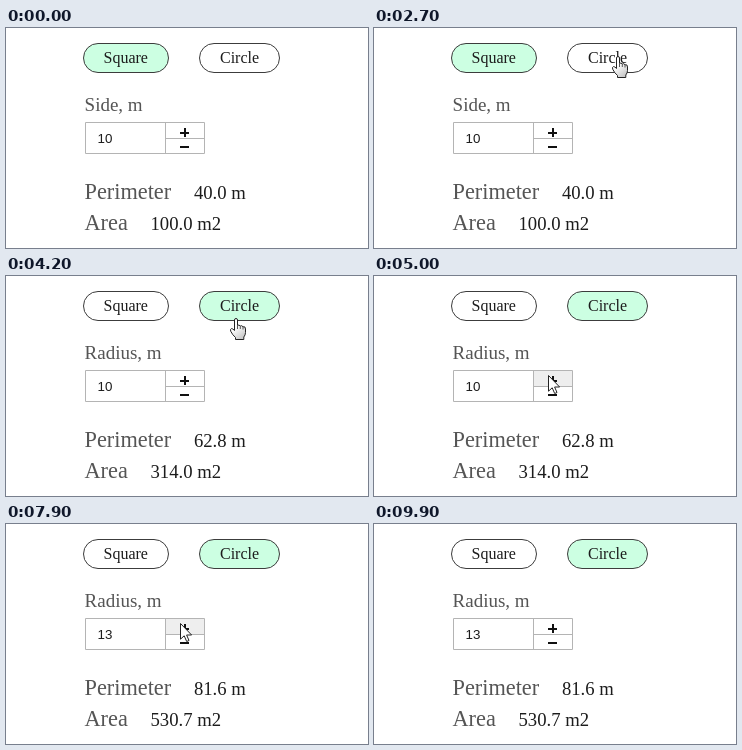
Write an HTML page that moves like this. It is 362 px wide and 220 px high and loops after 10 s.

```html
<!DOCTYPE html>
<html lang="en">
<head>
<meta charset="utf-8">
<title>Shape calculator</title>
<style>
  html, body { margin: 0; width: 100%; height: 100%; overflow: hidden; background: #fff; }
  svg { display: block; }
  text { font-family: "Liberation Serif", "Times New Roman", serif; fill: #1c1c1c; }
  .pill { fill: #fff; stroke: #3c3c3c; }
  .pill.on { fill: #ccffe2; }
  .tab { font-size: 16px; }
  .label { font-size: 19px; fill: #555; }
  .name { font-size: 22.3px; fill: #555; }
  .value { font-size: 18.7px; }
  .field { font: 13.33px "Liberation Sans", Arial, sans-serif; }
  .line { fill: none; stroke: #b4b4b4; }
  .cursor { fill: #fff; stroke: #222; stroke-linejoin: round; }
  .crease { fill: none; stroke: #555; }
</style>
</head>
<body>
<svg width="362" height="220" viewBox="0 0 362 220">
  <defs>
    <linearGradient id="skin" x1="0" y1="0" x2=".6" y2="1">
      <stop offset=".45" stop-color="#fff"/>
      <stop offset="1" stop-color="#ccc"/>
    </linearGradient>
  </defs>

  <rect id="squareTab" class="pill" x="77.5" y="15.5" width="85" height="29" rx="14.5"/>
  <text class="tab" x="97.5" y="35">Square</text>
  <rect id="circleTab" class="pill" x="193.5" y="15.5" width="80" height="29" rx="14.5"/>
  <text class="tab" x="214" y="35">Circle</text>

  <g id="form">
    <text id="label" class="label" x="78.6" y="83"></text>
    <rect id="plusBg" x="160" y="95" width="38" height="15" fill="#eee"/>
    <path class="line" d="M79.5 94.5H198.5V125.5H79.5ZM159.5 95V125M160 110.5H198"/>
    <text id="side" class="field" x="91.5" y="115"></text>
    <path d="M174 104h9v2h-9zM178 100h2v9h-2zM174 118h9v2h-9z" fill="#111"/>
  </g>
  <rect id="caret" x="106" y="103" width="1" height="15" fill="#000"/>

  <text class="name" x="78.5" y="171">Perimeter</text>
  <text id="perimeter" class="value" x="187.9" y="171"></text>
  <text class="name" x="78.5" y="202">Area</text>
  <text id="area" class="value" x="144.5" y="202"></text>

  <path id="arrow" class="cursor" d="M.5 .5V16.2L4.2 12.8 6.7 18.5 9 17.5 6.6 12H11.6Z"/>
  <g id="hand">
    <path class="cursor" style="fill: url(#skin)" d="M-1.5 12.5V2Q-1.5 .5 0 .5T1.5 2V7.5Q3 6.3 4.3 8 5.8 7 7 8.8 9.5 8 9.5 11V14.5Q9.5 17 7.8 19V21.5H-.5V19.5Q-3.5 17 -5.3 13.2 -6 11 -4.6 10.6 -3.2 10.5 -1.5 12.5Z"/>
    <path class="crease" d="M1.5 7.5V11M4.3 8V11M7 8.8V11.5"/>
  </g>
</svg>
<script>
const LOOP = 10000, STEP = 100, PI = 3.14;
const $ = id => document.getElementById(id);
const show = (id, on) => { $(id).style.display = on ? "" : "none"; };
const put = (id, text) => { if ($(id).textContent !== text) $(id).textContent = text; };

// Pointer key points: time, x, y
const path = [
  [1900, 351, 33], [2300, 296, 30], [2700, 244, 28], [4000, 244, 28],
  [5000, 174, 99], [8300, 174, 99], [8700, 234, 88], [9100, 299, 64], [9500, 362, 36]
];
const sizes = [[5800, 11], [6600, 12], [7400, 13]];
const carets = [[5800, 6300], [6600, 7200], [7400, 7900], [8400, 8900], [9500, 9900]];

function pointerAt(t) {
  const i = path.findIndex(p => p[0] > t);
  if (i < 1) return null;
  const [t0, x0, y0] = path[i - 1], [t1, x1, y1] = path[i];
  const k = (t - t0) / (t1 - t0);
  return [x0 + (x1 - x0) * k, y0 + (y1 - y0) * k].map(Math.round);
}

function drawPointer(t) {
  const p = pointerAt(t);
  const inside = (x, y, w, h) => !!p && p[0] >= x && p[0] < x + w && p[1] >= y && p[1] < y + h;
  const overTab = inside(193, 15, 81, 30);
  show("hand", overTab);
  show("arrow", p && !overTab);
  show("plusBg", inside(160, 95, 38, 15));
  if (p) $(overTab ? "hand" : "arrow").setAttribute("transform", `translate(${p})`);
}

function draw(now) {
  const t = Math.floor(now % LOOP / STEP) * STEP;
  const circle = t >= 3200;
  const n = sizes.reduce((v, [at, size]) => t >= at ? size : v, 10);

  $("squareTab").classList.toggle("on", !circle);
  $("circleTab").classList.toggle("on", circle);
  $("form").setAttribute("opacity", circle ? Math.min(1, (t - 3200) / 700) : 1);
  put("label", circle ? "Radius, m" : "Side, m");
  put("side", String(n));
  put("perimeter", (circle ? 2 * PI * n : 4 * n).toFixed(1) + " m");
  put("area", (circle ? PI * n * n : n * n).toFixed(1) + " m2");

  show("caret", carets.some(([on, off]) => t >= on && t < off));
  $("caret").setAttribute("x", n === 11 ? 105 : 106);
  drawPointer(t);
}

const start = performance.now();
function tick() {
  draw(performance.now() - start);
  requestAnimationFrame(tick);
}
tick();
</script>
</body>
</html>
```
